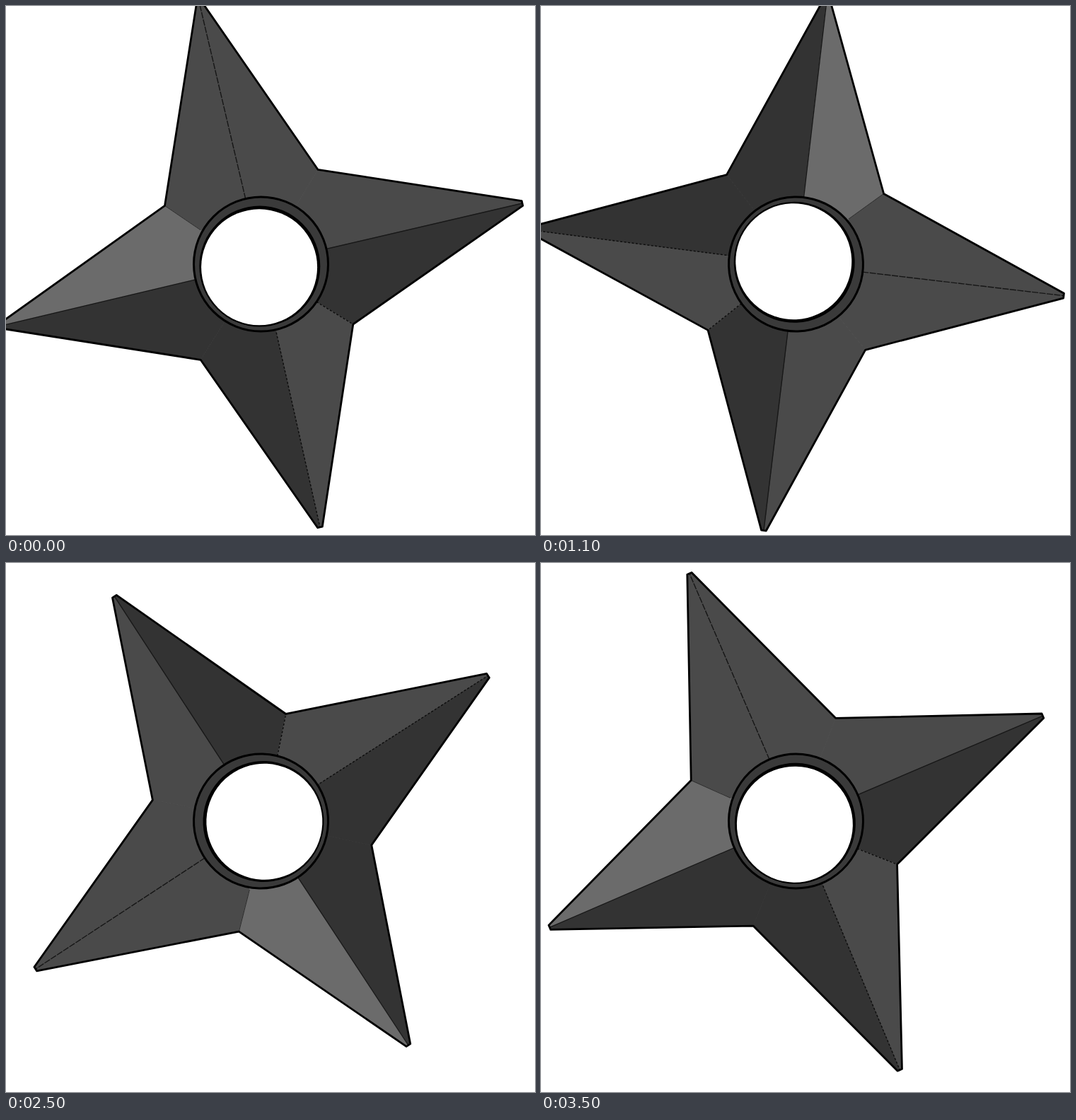
An HTML page for the animation above (3.6 s loop, 748x748 px).

```html
<!DOCTYPE html>
<html lang="en">
<head>
<meta charset="utf-8">
<title>Spinning throwing star</title>
<style>
  html, body { margin: 0; width: 100%; height: 100%; overflow: hidden; background: #fff; }
  svg { display: block; width: 100vw; height: 100vh; }
</style>
</head>
<body>
<svg viewBox="-360.5 -365 748 748"><g id="star"></g></svg>
<script>
  const LOOP = 3600, STEPS = 36;
  const MID = '#4a4a4a', DARK = '#333', LIGHT = '#6b6b6b', INK = '#000';
  const star = document.getElementById('star');

  // Blade tips and the notches between them, measured from the hub.
  const tips = { top: [-87.5, -371], right: [369.5, -86], bottom: [83.5, 372], left: [-369, 87.5] };
  const notch = { tr: [80.5, -133.7], rb: [130.3, 85], bl: [-85.3, 135.3], lt: [-136, -82.6] };
  const crease = { rb: [78.6, 53.4], lt: [-85.5, -48.3] };

  function add(tag, attrs) {
    const el = document.createElementNS('http://www.w3.org/2000/svg', tag);
    for (const key in attrs) el.setAttribute(key, attrs[key]);
    star.appendChild(el);
  }

  function shape(points, fill, stroke = fill, width = 0.8) {
    add('polygon', { points: points.join(' '), fill, stroke, 'stroke-width': width, 'stroke-linejoin': 'round' });
  }

  function line([x1, y1], [x2, y2], stroke, width, dash = 'none') {
    add('line', { x1, y1, x2, y2, stroke, 'stroke-width': width, 'stroke-dasharray': dash });
  }

  function disc(cx, cy, r, fill, stroke = 'none', width = 0) {
    add('circle', { cx, cy, r, fill, stroke, 'stroke-width': width });
  }

  // Each tip ends in a short flat edge.
  function blunt([x, y]) {
    const k = 3.4 / Math.hypot(x, y);
    return [[x + y * k, y - x * k], [x - y * k, y + x * k]];
  }

  function face(tip, side, fill) {
    shape([[0, 0], crease[side] || [0, 0], notch[side], blunt(tips[tip])[0], tips[tip]]
      .map((p, i) => i === 3 ? nearest(tip, side) : p), fill);
  }

  function nearest(tip, side) {
    const [a, b] = blunt(tips[tip]), n = notch[side];
    const gap = p => Math.hypot(p[0] - n[0], p[1] - n[1]);
    return gap(a) < gap(b) ? a : b;
  }

  [
    ['top', 'lt', MID], ['top', 'tr', MID], ['right', 'tr', MID], ['right', 'rb', DARK],
    ['bottom', 'rb', MID], ['bottom', 'bl', DARK], ['left', 'bl', DARK], ['left', 'lt', LIGHT]
  ].forEach(f => face(...f));

  line([0, 0], tips.top, '#161616', 1.4, '9 1.5');
  line([0, 0], tips.right, '#181818', 1.4);
  line([0, 0], tips.bottom, '#0c0c0c', 1.4, '3 2.5');
  line([0, 0], tips.left, '#181818', 1.4);
  line(crease.rb, notch.rb, '#0c0c0c', 1.4, '3 2.5');
  line(crease.lt, notch.lt, '#2c2c2c', 1);

  const rim = [
    ['top', 'lt', 'tr'], ['right', 'tr', 'rb'], ['bottom', 'rb', 'bl'], ['left', 'bl', 'lt']
  ].flatMap(([tip, from, to]) => [nearest(tip, from), nearest(tip, to), notch[to]]);
  shape(rim, 'none', INK, 2.8);

  disc(0, 0, 95, '#3a3a3a', INK, 3);
  disc(-1.7, 3.1, 85.5, INK);
  disc(-2.4, 4.3, 82, '#fff');

  function draw() {
    const step = Math.floor((performance.now() % LOOP) / LOOP * STEPS);
    star.setAttribute('transform', `rotate(${step * 360 / STEPS})`);
    requestAnimationFrame(draw);
  }
  draw();
</script>
</body>
</html>
```
